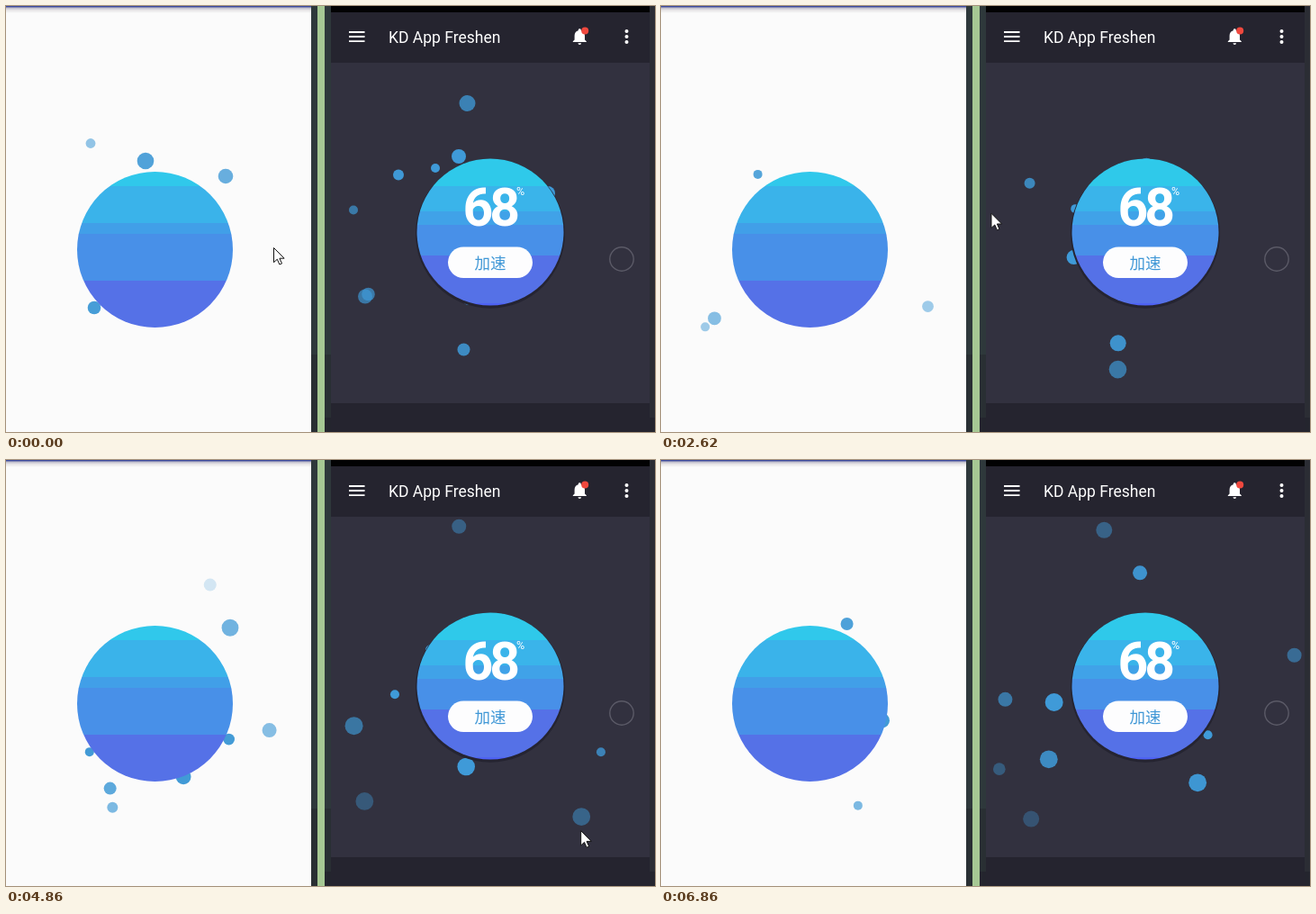
An HTML page that plays this animation: 721x473 px, repeating every 6.91 s.

```html
<!DOCTYPE html>
<html lang="en">
<head>
<meta charset="utf-8">
<title>App booster</title>
<style>
html, body { margin: 0; width: 100%; height: 100%; overflow: hidden; background: #fbfbfb; }
svg { display: block; width: 721px; height: 473px; }
</style>
</head>
<body>
<svg viewBox="0 0 721 473" xmlns="http://www.w3.org/2000/svg">
  <defs>
    <linearGradient id="shade" x1="0" y1="0" x2="0" y2="1">
      <stop offset="0" stop-color="#a9a9bd"/>
      <stop offset=".5" stop-color="#e6e4e6"/>
      <stop offset="1" stop-color="#fbfbfb"/>
    </linearGradient>
    <clipPath id="pageClip"><rect width="339" height="473"/></clipPath>
    <clipPath id="panelClip"><rect x="361" y="62" width="354" height="379"/></clipPath>
    <clipPath id="pageDisc"><circle cx="165.5" cy="270.5" r="86.5"/></clipPath>
    <clipPath id="panelDisc"><circle cx="538" cy="251" r="81.5"/></clipPath>
  </defs>

  <rect width="339" height="473" fill="#fbfbfb"/>
  <rect y="1" width="339" height="7" fill="url(#shade)"/>
  <rect width="339" height="1.4" fill="#3c4a9c"/>
  <g id="pageDots" clip-path="url(#pageClip)" fill="#419ad6"/>
  <g id="pageBands" clip-path="url(#pageDisc)"/>

  <rect x="339" width="382" height="473" fill="#2e383b"/>
  <rect x="339" y="387" width="382" height="86" fill="#292f33"/>
  <rect x="346" width="8" height="473" fill="#a6c894"/>
  <rect x="715" width="6" height="473" fill="#2b2d34"/>
  <rect x="354" y="457" width="367" height="16" fill="#24252e"/>
  <rect x="361" width="354" height="473" fill="#25242f"/>
  <rect x="361" y="63" width="354" height="378" fill="#32313f"/>
  <rect x="361" width="354" height="7" fill="#020203"/>

  <g fill="#fff">
    <path d="M381 28h17.5v1.9H381zM381 33.1h17.5v1.9H381zM381 38.2h17.5v1.9H381z"/>
    <text x="425" y="41" font-family="Roboto, sans-serif" font-size="17.5">KD App Freshen</text>
    <path d="M637.3 25.2c.9 0 1.5.6 1.5 1.4v.6c2.7.7 4.2 3 4.2 5.7v4.5l1.8 1.8v.9h-15v-.9l1.8-1.8v-4.5c0-2.7 1.5-5 4.2-5.7v-.6c0-.8.6-1.4 1.5-1.4zM635.5 41.2h3.6a1.8 1.8 0 0 1-3.6 0z"/>
    <circle cx="689.5" cy="28" r="2"/><circle cx="689.5" cy="34" r="2"/><circle cx="689.5" cy="40" r="2"/>
  </g>
  <circle cx="643.2" cy="27.4" r="4" fill="#f0483e"/>

  <g id="panelDots" clip-path="url(#panelClip)" fill="#3f9ad8"/>
  <circle cx="538" cy="252.7" r="83" fill="#252431"/>
  <g id="panelBands" clip-path="url(#panelDisc)"/>
  <circle cx="684" cy="281" r="13.2" fill="none" stroke="#5b5a67" stroke-width="1.4"/>
  <g fill="#fff" font-family="Roboto, sans-serif">
    <text x="507.5" y="243.7" font-size="59" font-weight="700" letter-spacing="-4">68</text>
    <text x="567" y="210" font-size="12.5">%</text>
  </g>
  <rect x="491" y="267.5" width="94" height="34.5" rx="17.25" fill="#fdfdfe"/>
  <text x="538" y="291.7" font-family="'Noto Sans CJK SC', 'Noto Sans CJK', sans-serif" font-size="17.5" text-anchor="middle" fill="#3f97d6">加速</text>

  <path id="cursor" d="M.5.5v16.2l3.8-3.5 2.6 5.8 2.6-1.1-2.6-5.7h5.2z" fill="#fff" stroke="#111" stroke-width="1"/>
</svg>
<script>
const LOOP = 6910, TICK = 133;
const $ = id => document.getElementById(id);
const clamp = v => Math.max(0, Math.min(1, v));

function make(tag, parent, attrs) {
  const el = document.createElementNS('http://www.w3.org/2000/svg', tag);
  for (const k in attrs) el.setAttribute(k, attrs[k]);
  return parent.appendChild(el);
}

function bands(parent, x, width, edges, colors) {
  colors.forEach((fill, i) => make('rect', parent,
    { x, y: edges[i], width, height: edges[i + 1] - edges[i], fill }));
}
bands($('pageBands'), 78, 176, [183, 200, 241, 253, 305, 359],
  ['#30c8eb', '#3ab3ea', '#419fe8', '#4890e8', '#5571e7']);
bands($('panelBands'), 455, 166, [168, 200, 228, 243, 277, 330, 334],
  ['#2fc9ea', '#3ab4ea', '#40a2e8', '#4890e8', '#5571e7', '#4e62f4']);

// A swarm drifts into its disc: dots fade in as they near it, px and radians per ms
const page = {
  id: 'pageDots', cx: 165.5, cy: 270.5, speed: .024, far: 200, span: 110,
  turn: () => 0,
  // time: [radius, x, y] of the dots that enter around then
  dots: {
    0: [[9.3, 155, 172], [8.3, 244, 189], [7.3, 98, 335], [5.4, 94, 152.5]],
    750: [[5, 82, 150], [7.4, 23, 373], [5, 13, 383]],
    1810: [[6.4, 314, 342]],
    3400: [[9.4, 274, 161], [7, 99, 396], [8.4, 210, 385]],
    4350: [[6, 113.5, 397.5], [8, 305, 303]],
    5450: [[7, 221, 151]],
    6860: [[5, 219, 384]]
  }
};
const panel = {
  id: 'panelDots', cx: 538, cy: 251, speed: .0275, far: 233, span: 115,
  turn: a => (3.8 + 3.7 * Math.abs(Math.sin(a / 2 - .96))) * 1e-5,
  dots: {
    0: [[9, 512.5, 108], [8, 503, 167], [5, 477, 180], [6, 436, 187.5], [5, 386, 226.5],
      [8, 399, 322.5], [7.3, 402.5, 320], [7, 508.5, 381.5], [7, 514, 325], [8, 602, 208]],
    750: [[9, 509, 427]],
    1810: [[6, 386, 196], [9.8, 509, 426.5]],
    3400: [[5, 393, 276], [5, 704, 330], [9.9, 677, 418.5]],
    4350: [[10, 374, 304], [9.9, 391, 392.5], [8, 493, 61]],
    6860: [[9, 492, 77.5], [8, 704, 216.5], [8, 382, 266], [6.8, 375.5, 343.5], [9, 411, 399]]
  }
};

function dot(swarm, at, [r, x, y]) {
  const { cx, cy, speed, far, span } = swarm;
  const el = make('circle', $(swarm.id), { r });
  const dist = Math.hypot(x - cx, y - cy);
  const angle = Math.atan2(y - cy, x - cx);
  const turn = swarm.turn(angle);
  return t => {
    const age = t - at;
    const d = Math.max(0, dist - speed * age);
    const a = angle + turn * age;
    const born = at ? clamp((age + 700) / 300) : 1;
    el.setAttribute('cx', cx + d * Math.cos(a));
    el.setAttribute('cy', cy + d * Math.sin(a));
    el.setAttribute('opacity', clamp((far - d) / span) * born);
  };
}

const dots = [page, panel].flatMap(swarm => Object.entries(swarm.dots)
  .flatMap(([at, list]) => list.map(p => dot(swarm, +at, p))));

// Pointer path: [time, x, y]
const path = [[0, 297, 268], [750, 195, 240], [1700, 135, 107], [1830, 135, 107],
  [3400, 595, 351], [4350, 595, 374], [5420, 682, 449], [5810, 686, 475], [LOOP, 686, 480]];

function moveCursor(t) {
  const i = path.findIndex(p => p[0] > t);
  const [t0, x0, y0] = path[i - 1], [t1, x1, y1] = path[i];
  const k = (t - t0) / (t1 - t0);
  $('cursor').setAttribute('transform', `translate(${x0 + (x1 - x0) * k} ${y0 + (y1 - y0) * k})`);
}

function draw(time) {
  // The picture refreshes in steps
  const t = Math.max(0, Math.floor((time + 60) / TICK) * TICK - 40);
  dots.forEach(move => move(t));
  moveCursor(t);
}

const start = performance.now();
function loop() {
  draw((performance.now() - start) % LOOP);
  requestAnimationFrame(loop);
}
loop();
</script>
</body>
</html>
```
